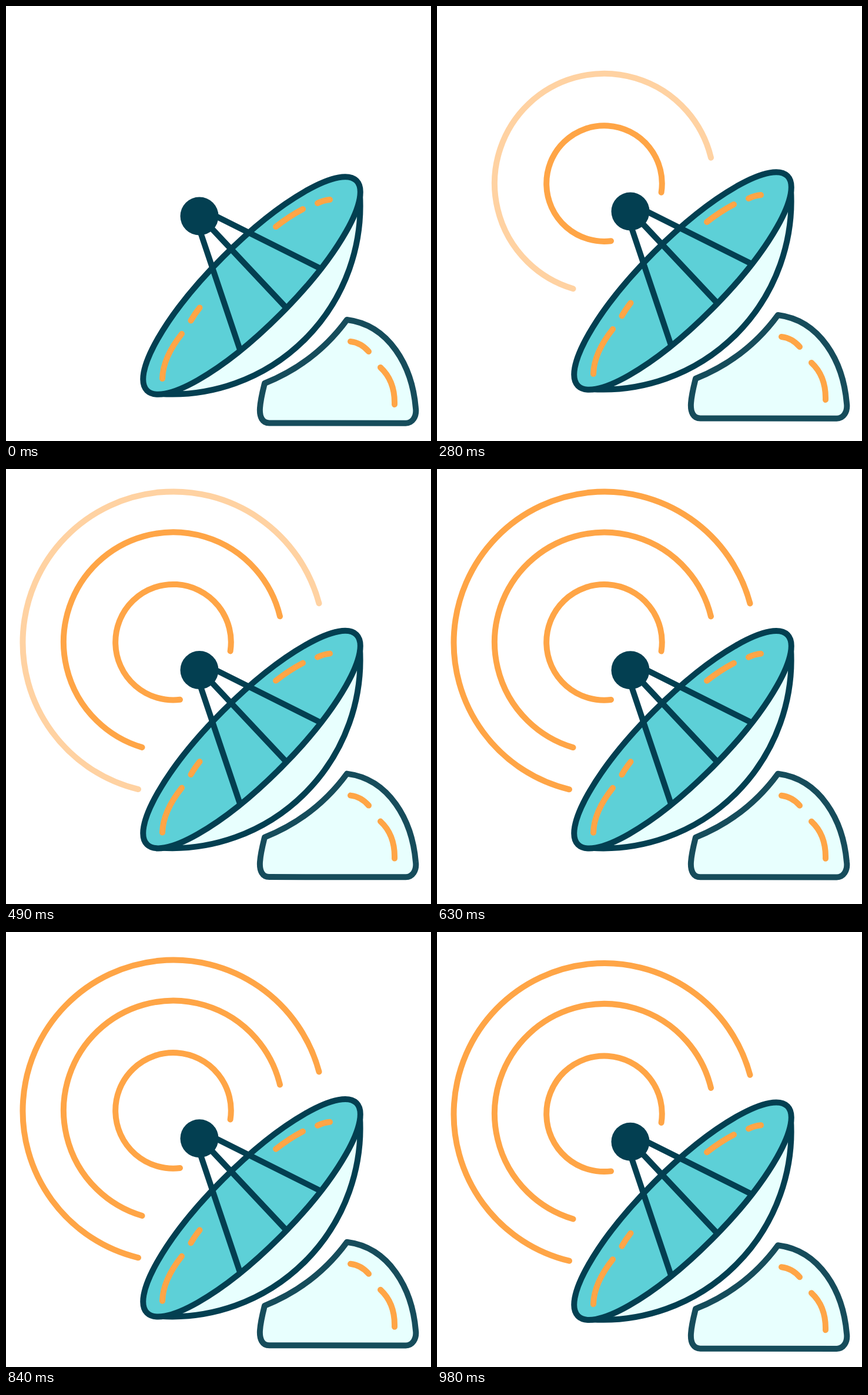
Animation, 723 px wide and 739 px high, one loop 1050 ms. Source, as an HTML page:

```html
<!DOCTYPE html>
<html lang="en">
<head>
<meta charset="utf-8">
<title>Satellite dish</title>
<style>
  html, body { margin: 0; height: 100%; overflow: hidden; background: #fff; }
  svg { display: block; width: 100%; height: 100%; }
  .dark { stroke: #033f51; }
  .orange { stroke: #ffa546; fill: none; }
</style>
</head>
<body>
<svg viewBox="0 0 723 739">
  <g id="scene" stroke-width="10" stroke-linecap="round" stroke-linejoin="round">
    <g class="orange">
      <path class="wave" d="M381.6 324.8A98.3 98.3 0 1 0 296 407.2"/>
      <path class="wave" d="M466 265.7A186.6 186.6 0 1 0 231.5 488.3"/>
      <path class="wave" d="M532.5 243.6A256.4 256.4 0 1 0 225 559.5"/>
    </g>

    <path fill="#e8fffe" stroke="#164c5b" d="M580 533C652 542 691 612 697 683C699 698 691 708.7 680 708.7
      L448 708.5C436 708.5 431 698 432 683C433 668 437 653 440 641C500 617 547 578 580 533Z"/>

    <g class="dark">
      <path fill="#e8fffe" d="M602 320A320 320 0 0 1 263 659Z"/>
      <ellipse fill="#5dd0d7" rx="252" ry="69" transform="translate(418 475) rotate(-45)"/>
      <path stroke-linecap="butt" d="M330 382L398 584M350 378L477 513M357 357L535 446"/>
    </g>
    <circle cx="329" cy="357" r="32.5" fill="#033f51"/>

    <path class="orange" d="M459 375Q482 357 505 345M530 335Q540 330 551 329
      M329.5 512.5Q321 523 314.5 534.5M299 557Q267 597 266 633
      M586 570Q604 572 617 587M637 614Q662 637 661 677"/>
  </g>
</svg>
<script>
  const LOOP = 1050, STEP = 70, PEAK = 560, LIFT = 16;
  const scene = document.getElementById('scene');
  const waves = document.querySelectorAll('.wave');
  const clamp = x => Math.min(1, Math.max(0, x));
  const ease = x => (1 - Math.cos(Math.PI * x)) / 2;

  function draw(now) {
    const t = Math.floor(now % LOOP / STEP) * STEP;
    const rise = t < PEAK ? t / PEAK : (LOOP - t) / (LOOP - PEAK);
    scene.setAttribute('transform', `translate(0 ${-LIFT * ease(rise)})`);
    waves.forEach((wave, i) => {
      wave.style.opacity = clamp((t - i * 210) / 140);
    });
  }

  const start = performance.now();
  function tick() {
    draw(performance.now() - start);
    requestAnimationFrame(tick);
  }
  tick();
</script>
</body>
</html>
```
